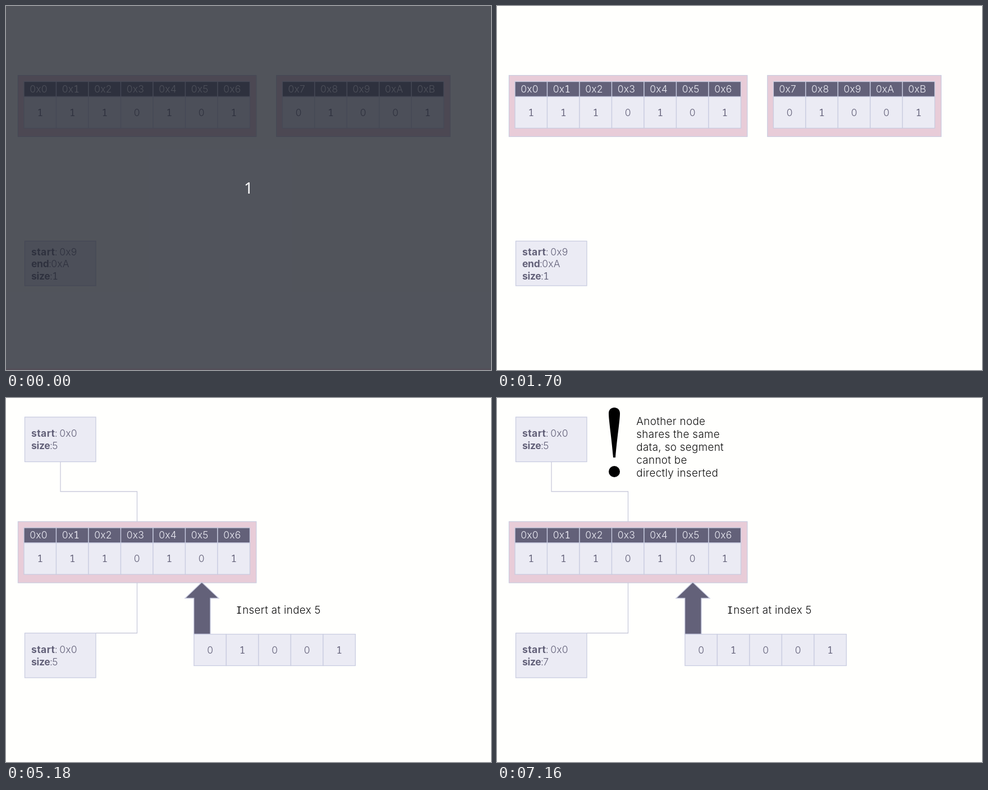
Animation, 864 px wide and 648 px high, one loop 8000 ms. Source, as an HTML page:

```html
<!DOCTYPE html>
<html lang="en">
<head>
<meta charset="utf-8">
<title>Inserting into shared data</title>
<style>
html, body { margin: 0; width: 100%; height: 100%; overflow: hidden; background: #fffffd; }
svg { display: block; width: 864px; height: 648px; }
text { font: 300 17.5px Inter, "Open Sans", sans-serif; letter-spacing: .2px; fill: #636179; white-space: pre; }
.serif { font-family: "Noto Sans Mono", monospace; }
.bold { font-weight: 700; letter-spacing: -.3px; }
.wide { letter-spacing: .4px; }
.head { fill: #ededf5; }
.mid { text-anchor: middle; letter-spacing: 0; }
.note text { font-size: 18.8px; letter-spacing: .35px; fill: #111; }
.panel { fill: #e8ccd8; stroke: #c9cce0; stroke-width: 1.2; }
.cell { fill: #ebebf4; stroke: #c9cce0; stroke-width: 1.3; }
.dark { fill: #636179; stroke: #c9cce0; stroke-width: 1.3; }
.wire { fill: none; stroke: #c9cadb; stroke-width: 1.3; }
.count { font: 400 28px "Noto Sans", sans-serif; fill: #fff; }

.step { animation: 8s step-end infinite; }
#cover { animation-name: cover; }
#split { animation-name: split; }
#joined { animation-name: joined; }
#insert { animation-name: insert; }
#warn { animation-name: warn; }
.five { animation-name: five; }
.seven { animation-name: seven; }
@keyframes cover { 0% { opacity: 1 } 6.25%, 100% { opacity: 0 } }
@keyframes split { 0% { opacity: 1 } 31.25%, 100% { opacity: 0 } }
@keyframes joined { 0% { opacity: 0 } 31.25%, 100% { opacity: 1 } }
@keyframes insert { 0% { opacity: 0 } 51.25%, 100% { opacity: 1 } }
@keyframes warn { 0% { opacity: 0 } 73.75%, 100% { opacity: 1 } }
@keyframes five { 0% { opacity: 0 } 51.25% { opacity: 1 } 73.75%, 100% { opacity: 0 } }
@keyframes seven { 0% { opacity: 1 } 51.25% { opacity: 0 } 73.75%, 100% { opacity: 1 } }
</style>
</head>
<body>
<svg viewBox="0 0 864 648">
  <rect width="864" height="648" fill="#fffffd"/>
  <g id="split" class="step"></g>
  <g id="joined" class="step"></g>
  <g id="insert" class="step"></g>
  <g id="warn" class="step note">
    <path d="M199 27C199 13.5 219 13.5 219 27C219 40 214 70 211 106H207C204 70 199 40 199 27Z"/>
    <circle cx="209" cy="131" r="10"/>
  </g>
  <g id="cover" class="step">
    <rect width="864" height="648" fill="rgb(32,36,46)" fill-opacity=".776"/>
    <rect y="645.5" width="864" height="2.5" fill="#5a4350" fill-opacity=".35"/>
    <text class="count mid" x="432" y="334">1</text>
  </g>
</svg>
<script>
const STEP = 57.5;

const add = (id, markup) => document.getElementById(id).insertAdjacentHTML('beforeend', markup);
const rect = (x, y, w, h, cls) => `<rect x="${x}" y="${y}" width="${w}" height="${h}" class="${cls}"/>`;

// Ones and capital I carry slab serifs
const text = (x, y, str, cls = '') =>
  `<text x="${x}" y="${y}" class="${cls}">${str.replace(/[1I]/g, '<tspan class="serif">$&</tspan>')}</text>`;

const bits = (x, y, values) => [...values].map((v, i) =>
  rect(x + i * STEP, y, STEP, 56, 'cell') +
  text(x + i * STEP + 28.7, y + 34.1, v, 'mid')).join('');

function block(x, y, first, values) {
  const w = values.length * STEP;
  const heads = [...values].map((_, i) => {
    const label = '0x' + (first + i).toString(16).toUpperCase();
    const left = x + i * STEP;
    return rect(left, y + 11, STEP, 27, 'dark') + text(left + 10.2, y + 30.3, label, 'head');
  }).join('');
  return rect(x - 10.6, y, w + 22, 109, 'panel') + heads + bits(x, y + 38, values);
}

const box = y => rect(33.5, y, 126.5, 79.5, 'cell');
const start = (y, addr) =>
  text(45, y, 'start', 'bold wide') + text(86.8, y, ':') + text(95.3, y, addr);
const size = (y, n, cls = '') =>
  text(45, y, 'size', 'bold') + text(78, y, ':') + text(82.3, y, n, cls);

add('split',
  block(32, 123.5, 0, '1110101') + block(492.4, 123.5, 7, '01001') +
  box(418.5) + start(443.5, '0x9') +
  text(45, 465, 'end', 'bold') + text(76, 465, ':') + text(80.3, 465, '0xA') +
  size(486.5, '1'));

add('joined',
  '<path class="wire" d="M97 113.5V166.5H233.5V220M233.5 329V418.5H160"/>' +
  block(32, 220, 0, '1110101') +
  box(34) + start(69, '0x0') + size(91, '5') +
  box(418.5) + start(454, '0x0') + size(476, '7', 'step seven') +
  text(82.3, 476, '5', 'step five'));

add('insert',
  '<path class="dark" d="M348.8 328L379 356.5H364V420.5H334.7V356.5H319Z"/>' +
  bits(334.9, 420.5, '01001') +
  `<g class="note">${text(409.5, 384, 'Insert at index 5')}</g>`);

const lines = ['Another node', 'shares the same', 'data, so segment', 'cannot be', 'directly inserted'];
add('warn', lines.map((line, i) => text(248.3, 47.8 + i * 23, line)).join(''));
</script>
</body>
</html>
```
